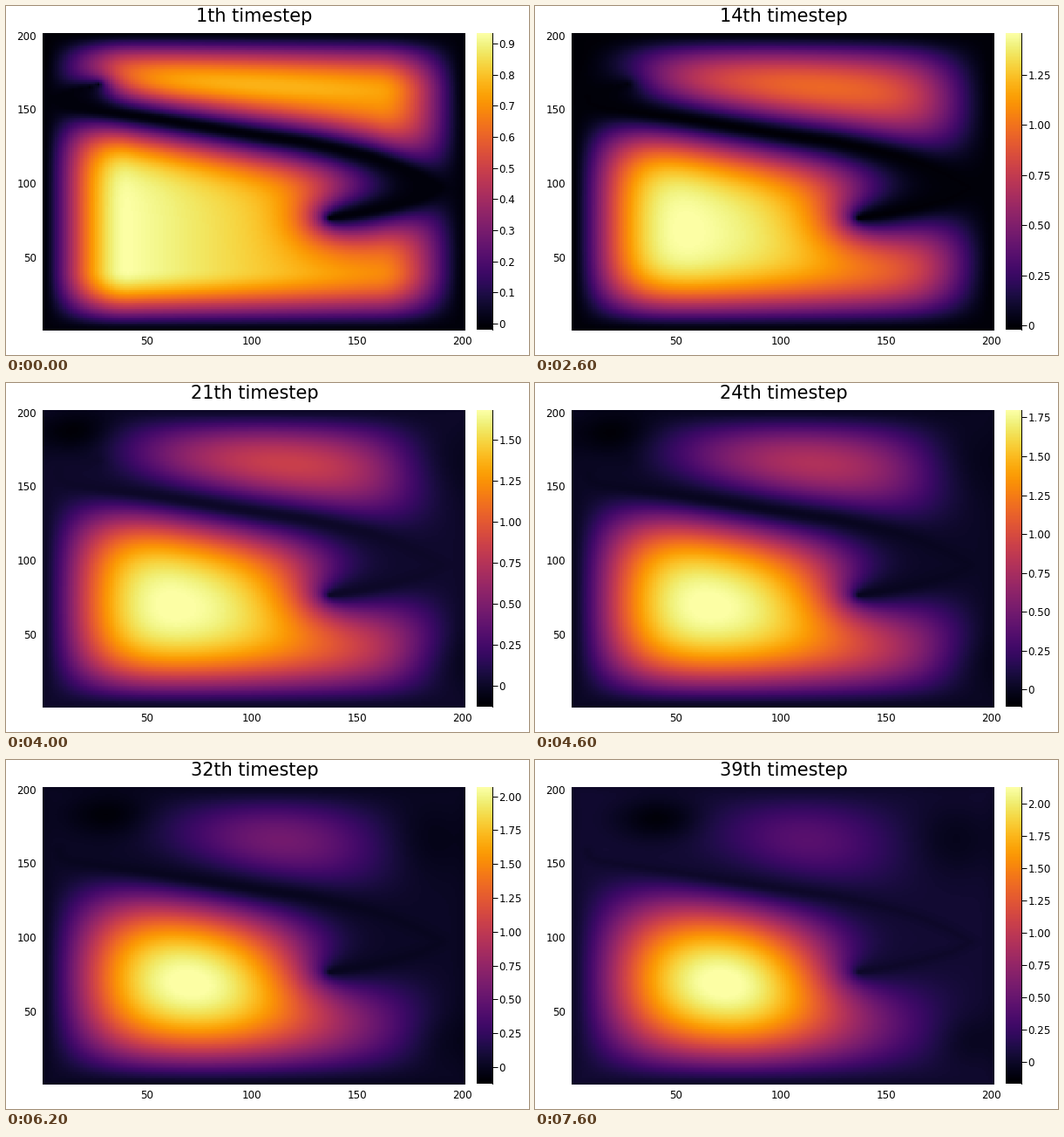
Animation, 600 px wide and 400 px high, one loop 7.8 s. Source, as a matplotlib script:

```python
import numpy as np
import matplotlib.pyplot as plt
from matplotlib.animation import FuncAnimation

W, H, DPI = 600, 400, 100
STEPS, SIZE = 39, 201
DT, SOFTEN_TIME, FLOW_TIME = 0.2, 170, 600
TICK_PT, TITLE_PT = 8.55, 15

plt.rcParams["font.family"] = "DejaVu Sans"

# The thin barrier: a long sloping edge, a slit from the right, and a few pins.
EDGE = [(8, 159), (9, 154), (14, 151.5), (50, 144.5), (107, 131.5), (125, 128),
        (140, 123.5), (155, 118.5), (167, 113), (180, 105), (190, 97)]
SLIT = [(181, 90), (165, 84), (150, 79.5), (137, 76.5)]
PINS = [(27, 167), (23, 165), (19, 164), (15, 163), (11, 161)]

# Colour range and upper lobe height at a few steps.
KEYS = [1, 9, 14, 21, 28, 32, 39]
LOW = [-0.020, -0.031, -0.022, -0.130, -0.084, -0.122, -0.169]
HIGH = [0.934, 1.287, 1.459, 1.681, 1.953, 2.068, 2.125]
UPPER = [0.77, 0.92, 0.95, 0.83, 0.69, 0.55, 0.38]

grid = np.arange(1, SIZE + 1, dtype=float)
X, Y = np.meshgrid(grid, grid)


def segment_distance(a, b):
    (ax, ay), (bx, by) = a, b
    dx, dy = bx - ax, by - ay
    s = np.clip(((X - ax) * dx + (Y - ay) * dy) / (dx * dx + dy * dy), 0, 1)
    return np.hypot(X - ax - s * dx, Y - ay - s * dy)


def ramp(d, width=41):
    return np.sin(np.pi / 2 * np.clip(d / width, 0, 1))


def shrink(u, k):
    """Soft threshold scaled to a peak of one."""
    u = u / u.max()
    return u * u / (u + k) * (1 + k)


def bump(cx, cy, sx, sy):
    return np.exp(-((X - cx) / sx) ** 2 - ((Y - cy) / sy) ** 2)


def diffuse(u, free, count):
    """Heat flow held at zero wherever free is zero."""
    for _ in range(count):
        p = np.pad(u, 1, mode="edge")
        lap = p[2:, 1:-1] + p[:-2, 1:-1] + p[1:-1, 2:] + p[1:-1, :-2] - 4 * u
        u = (u + DT * lap) * free
    return u


path = EDGE + SLIT
barrier = np.min([segment_distance(a, b) for a, b in zip(path, path[1:])], axis=0)
wall = np.minimum(np.minimum(X - 1, SIZE - X), np.minimum(Y - 1, SIZE - Y))
above = Y > np.interp(X, [p[0] for p in EDGE], [p[1] for p in EDGE])
thin = np.tanh(np.minimum(barrier, wall) / 5)

open_cells = (barrier > 0.9).astype(float)
for px, py in PINS:
    open_cells[py - 1, px - 1] = 0


def flow():
    u = (1 - 0.0017 * (X - 38)) * diffuse(open_cells, open_cells, round(SOFTEN_TIME / DT))
    u *= ramp(X - 1) * ramp(SIZE - X) * ramp(Y - 1) * ramp(SIZE - Y)
    free = open_cells * (wall > 0)
    times = FLOW_TIME * np.linspace(0, 1, STEPS) ** 1.7
    counts = np.diff(np.round(times / DT).astype(int), prepend=0)
    for count in counts:
        u = diffuse(u, free, count)
        yield u


def limits(n):
    return np.interp(n, KEYS, LOW), np.interp(n, KEYS, HIGH)


def field(u, n):
    lo, hi = limits(n)
    t = (n - 1) / (STEPS - 1)
    lower = np.where(above, 0, u) * np.exp(-(np.maximum(X - 75, 0) / 130) ** 2 * t * t)
    upper = np.where(above, u, 0) * np.exp(-((X - 102) / 55) ** 2 * t * t)
    z = hi * shrink(lower, 0.2)
    z += np.interp(n, KEYS, UPPER) * shrink(upper, 0.2 + 0.3 * t)
    z += 0.035 * np.clip((n - 9) / 30, 0, 1) * thin
    cx = np.interp(n, [21, 39], [17, 42])
    cy = np.interp(n, [21, 39], [187, 180])
    z += lo * (bump(cx, cy, 20, 14) + 0.55 * bump(182, 166, 20, 24)
               + 0.5 * bump(187, 31, 16, 18))
    return z


fields = [field(u, i + 1) for i, u in enumerate(flow())]

fig = plt.figure(figsize=(W / DPI, H / DPI), dpi=DPI, facecolor="white")


def pixel_axes(left, top, right, bottom):
    return fig.add_axes([left / W, 1 - bottom / H, (right - left) / W, (bottom - top) / H])


ax = pixel_axes(42, 31, 527, 371.6)
heat = ax.imshow(fields[0], cmap="inferno", origin="lower", aspect="auto",
                 interpolation="nearest", extent=[0.5, 201.5, 0.5, 201.5])
ax.set_xticks([50, 100, 150, 200])
ax.set_yticks([50, 100, 150, 200])
ax.tick_params(length=0, pad=5, labelsize=TICK_PT)
ax.tick_params(axis="x", pad=4.3)
ax.spines[:].set_visible(False)

bar = pixel_axes(540, 31, 558, 371)
scale = bar.imshow(np.linspace(0, 1, 256)[:, None], cmap="inferno", origin="lower",
                   aspect="auto", extent=[0, 1, 0, 1])
bar.set_xticks([])
bar.yaxis.tick_right()
bar.tick_params(axis="y", length=4.3, width=0.72, pad=1, labelsize=TICK_PT)
bar.spines[["left", "top", "bottom"]].set_visible(False)
bar.spines["right"].set_linewidth(0.72)

title = fig.text(285 / W, 1 - 18 / H, "", size=TITLE_PT, ha="center", va="baseline")


def draw(i):
    n = i + 1
    lo, hi = limits(n)
    heat.set_data(fields[i])
    heat.set_clim(lo, hi)
    scale.set_extent([0, 1, lo, hi])
    bar.set_ylim(lo, hi)
    step, digits = (0.25, 2) if hi > 1 else (0.1, 1)
    ticks = np.arange(int(hi / step) + 1) * step
    bar.set_yticks(ticks, [f"{v:.{digits}f}" if v else "0" for v in ticks])
    title.set_text(f"{n}th timestep")
    return heat, scale, title


anim = FuncAnimation(fig, draw, frames=STEPS, interval=200, repeat=True,
                     repeat_delay=0, blit=False)
plt.show()
```
